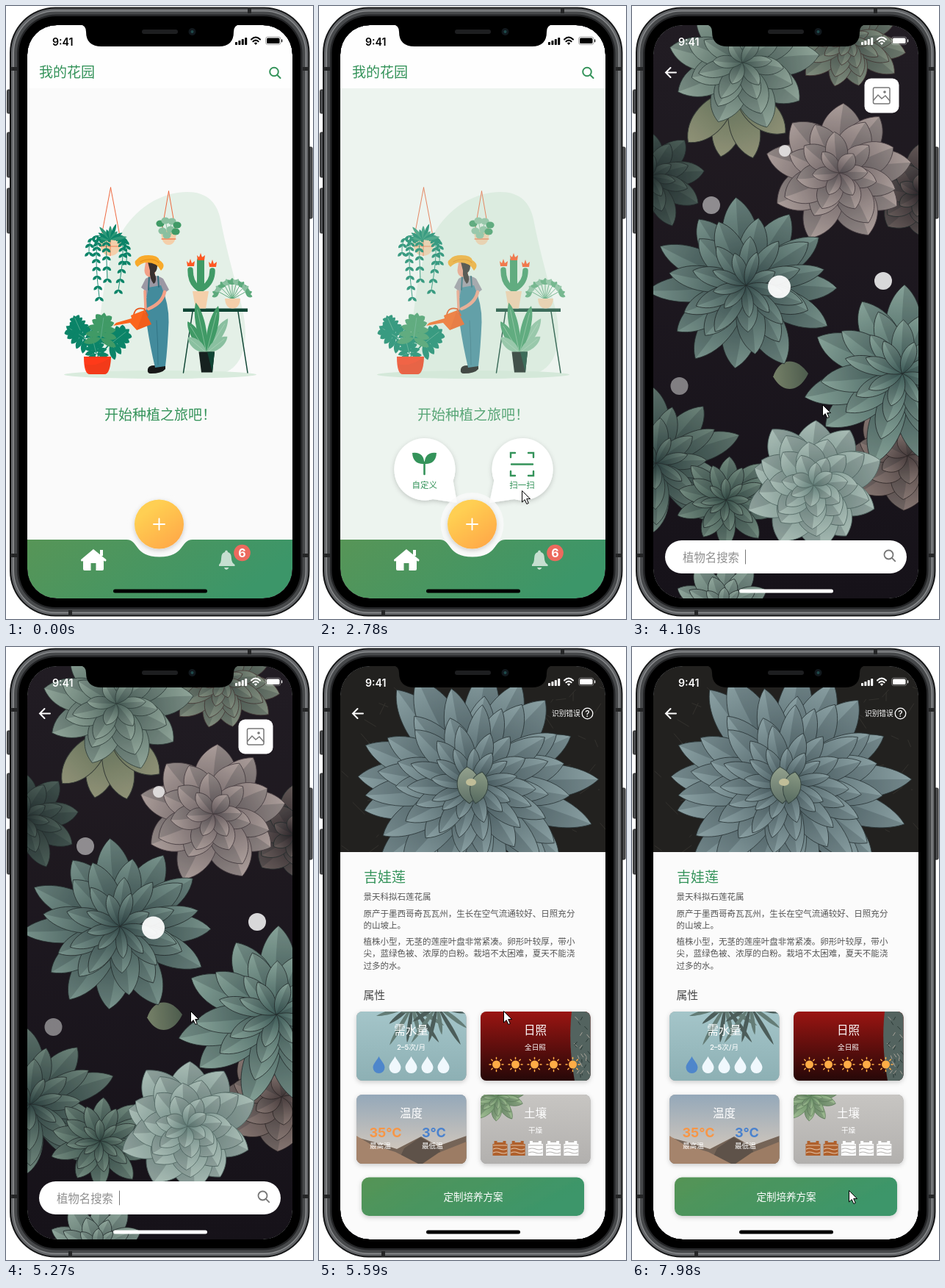
An HTML page that plays this animation: 418x834 px, repeating every 8 s.

```html
<!DOCTYPE html>
<html lang="zh-CN">
<head>
<meta charset="utf-8">
<title>我的花园</title>
<style>
html, body { margin: 0; width: 100%; height: 100%; overflow: hidden; background: #fff; }
svg { display: block; }
text { font-family: Inter, "Noto Sans CJK SC", "Noto Sans CJK", sans-serif; }
</style>
</head>
<body>
<script>
const GREEN = '#34935a';
let defs = '', seed = 7, gradients = {};
const rnd = () => (seed = (seed * 16807) % 2147483647) / 2147483647;
const jit = a => (rnd() - .5) * 2 * a;
const num = v => +v.toFixed(1);

// shape helpers
const path = (d, fill, more = '') => `<path d="${d}" fill="${fill}" ${more}/>`;
const line = (d, color, w = 1, more = '') => `<path d="${d}" fill="none" stroke="${color}" stroke-width="${w}" stroke-linecap="round" ${more}/>`;
const rect = (x, y, w, h, r, fill, more = '') => `<rect x="${x}" y="${y}" width="${w}" height="${h}" rx="${r}" fill="${fill}" ${more}/>`;
const oval = (x, y, rx, ry, fill, more = '') => `<ellipse cx="${x}" cy="${y}" rx="${rx}" ry="${ry}" fill="${fill}" ${more}/>`;
const disc = (x, y, r, fill, more) => oval(x, y, r, r, fill, more);
const text = (x, y, size, str, fill, weight = 400, anchor = 'start') =>
  `<text x="${x}" y="${y}" font-size="${size}" fill="${fill}" font-weight="${weight}" text-anchor="${anchor}">${str}</text>`;
const group = (inner, more = '') => `<g ${more}>${inner}</g>`;
const at = (x, y, inner, more = '') => group(inner, `transform="translate(${x} ${y})" ${more}`);

function grad(a, b, dir = 'x1="0" y1="1" x2="0" y2="0"') {
  const key = a + b + dir;
  if (!gradients[key]) {
    const id = gradients[key] = 'g' + Object.keys(gradients).length;
    defs += `<linearGradient id="${id}" ${dir}><stop stop-color="${a}"/><stop offset="1" stop-color="${b}"/></linearGradient>`;
  }
  return `url(#${gradients[key]})`;
}
const ACROSS = 'x1="0" y1="0" x2="1" y2=".3"';

// a leaf points up from its base before it is turned
const leafPath = (l, w) => `M0 0C${num(w)} ${num(-l * .3)} ${num(w)} ${num(-l * .78)} 0 ${num(-l)}C${num(-w)} ${num(-l * .78)} ${num(-w)} ${num(-l * .3)} 0 0Z`;
const leaf = (x, y, l, w, turn, fill, more = '') =>
  path(leafPath(l, w), fill, `transform="translate(${num(x)} ${num(y)}) rotate(${num(turn)})" ${more}`);

function petal(l, w, turn, fill, edge) {
  const half = `M0 0C${num(w)} ${num(-l * .3)} ${num(w)} ${num(-l * .78)} 0 ${num(-l)}Q${num(-w * .15)} ${num(-l * .5)} 0 0Z`;
  return group(path(leafPath(l, w), fill, `stroke="${edge}" stroke-width=".8"`) + path(half, '#0b1718', 'opacity=".17"'),
    `transform="rotate(${num(turn)})"`);
}
function rosette(x, y, r, rings, n, fat, low, high, edge = '#26302f', squash = .9) {
  let s = '';
  const fill = grad(low, high);
  for (let k = 0; k < rings; k++) {
    const l = r * (1 - .82 * k / rings), count = Math.max(4, n - k);
    for (let i = 0; i < count; i++) {
      s += petal(l * (1 + jit(.09)), l * fat * (1 + jit(.12)), (i + k * .5) * 360 / count + jit(7), fill, edge);
    }
  }
  return group(s, `transform="translate(${x} ${y}) scale(1 ${squash})"`);
}

function vine(x0, y0, cx, cy, x1, y1, n, color) {
  let s = line(`M${x0} ${y0}Q${cx} ${cy} ${x1} ${y1}`, color, .9);
  for (let i = 1; i <= n; i++) {
    const u = i / n, v = 1 - u;
    const x = v * v * x0 + 2 * u * v * cx + u * u * x1, y = v * v * y0 + 2 * u * v * cy + u * u * y1;
    s += leaf(x, y, 8, 2.6, 135, color) + leaf(x, y, 8, 2.6, 225, color);
  }
  return s;
}
function fan(x, y, l, turn, color) {
  let s = leaf(0, 0, l, l * .25, 0, color);
  for (let i = 0; i < 5; i++) for (const side of [-1, 1])
    s += leaf(0, -l * i * .16, l * (.68 - i * .07), l * .17, side * (112 - i * 15), color);
  return group(s + line(`M0 0V${-l * .8}`, '#6fb79c', .6), `transform="translate(${x} ${y}) rotate(${turn})"`);
}

const lens = (x, y, r, color, w) => disc(x, y, r, 'none', `stroke="${color}" stroke-width="${w}"`) +
  line(`M${x + r * .72} ${y + r * .72}l${r * .75} ${r * .75}`, color, w);
const backArrow = line('M60 90.5H46M52.5 84L46 90.5L52.5 97', '#fff', 2);
const homeBar = color => rect(146, 793.5, 128, 5, 2.5, color);

function status(color) {
  let s = text(63, 53.8, 14.2, '9:41', color, 600);
  for (let i = 0; i < 4; i++) s += rect(312 + i * 4.4, 49 - i * 2, 3, 4 + i * 2, .8, color);
  s += line('M334 45.5Q340 39.5 346 45.5M336.4 48.3Q340 45 343.6 48.3', color, 2) + path('M340 53l-2.2-2.4q2.2-2 4.4 0z', color);
  return s + rect(353.5, 42, 20.5, 10.5, 3, 'none', `stroke="${color}" stroke-width=".7" opacity=".5"`) +
    rect(355, 43.5, 17.5, 7.5, 1.6, color) + rect(375, 45.3, 1.2, 4, .6, color);
}

function illustration() {
  const teal = '#0b8468', mid = '#409a66', pale = '#8ac0a0', dark = '#0f4534', tan = '#f4cfaa', red = '#ee5a2c', skin = '#f2a087';
  let s = path('M119 500C128 450 128 375 149 325C166 283 205 253 247 253C272 253 287 266 292 290C299 327 309 362 319 401C333 450 326 490 295 500Z', '#e4f0e7') +
    oval(210, 501.5, 131, 5.5, '#d9ebdd');
  // hanging pots
  s += line('M142.500 247L130 313M142.500 247L155 313', red, .9) +
    path('M127 314H157Q157 340 142 340Q127 340 127 314Z', tan) + line('M127 327H157M142 314V340', red, .7);
  for (const [x, c, x1, y1, n] of [[134, 116, 127, 396, 11], [131, 112, 113, 335, 4], [138, 135, 138, 371, 7], [150, 167, 153, 386, 10], [148, 168, 164, 347, 6], [145, 155, 160, 316, 3]])
    s += vine(x, 313, c, 308, x1, y1, n, teal);
  for (let i = 0; i < 9; i++) s += leaf(142, 318, 15 + i % 3 * 4, 3, -80 + i * 20, i % 2 ? teal : '#2f9878');
  s += line('M221.500 252L212 307M221.500 252L231 307', red, .9) + path('M211 305H232Q232 325 221.500 325Q211 325 211 305Z', tan) +
    line('M212 317H231', red, 1);
  [[210, 296], [217, 292], [226, 293], [233, 298], [213, 306], [224, 304], [231, 307], [219, 312]].forEach(([x, y], i) =>
    s += line(`M221 312L${x} ${y}`, mid, .6) + oval(x, y, 5.6, 4.5, i % 3 ? pale : mid));
  // table with cacti
  s += line('M254 416L241.500 499M316 416L329 499', dark, 1.5) + rect(241, 411.500, 88, 4.500, 0, dark);
  s += line('M265 384V346', mid, 10) + line('M262 384Q251 377 251 359M268 384Q281 376 281 360', mid, 7.5);
  for (const [x, y] of [[251, 354], [265, 346], [281, 355]]) s += path(`M${x - 4} ${y}l-1-7l3 3l2-6l2 6l4-3l-1 7z`, '#ff5722');
  s += path('M254 388H276L272 411.500H258Z', tan);
  for (let i = 0; i < 9; i++) {
    const a = -64 + i * 16, q = a * Math.PI / 180, x = 308 + 21 * Math.sin(q), y = 399 - 24 * Math.cos(q);
    s += line(`M308 399L${num(x)} ${num(y)}`, mid, .8);
    for (const b of [-45, 0, 45]) s += leaf(x, y + 4, 9, 3, a + b, i % 2 ? pale : '#5daa7c');
  }
  s += path('M298 398H319Q318 411.500 308.500 411.500Q299 411.500 298 398Z', tan);
  // floor plants
  for (const [a, l, f] of [[-31, 50, mid], [32, 55, pale], [-12, 70, mid], [14, 66, mid], [-50, 33, pale], [52, 36, pale]])
    s += leaf(273, 472, l, 8.5, a, f) + line(`M273 472l${num(Math.sin(a / 57.3) * l * .85)} ${num(-Math.cos(a / 57.3) * l * .85)}`, '#bcdcc5', .5);
  s += path('M262.500 470.500H284L281 498.500H266Z', '#16211f') + path('M274 470.500H284L281 498.500Z', dark);
  s += line('M122 479Q117 461 102 450M125 479Q127 463 132 450M127 479Q136 463 148 454M121 479Q119 470 116 464', teal, 1.6);
  s += fan(108, 452, 31, -58, teal) + fan(142, 460, 33, 52, teal) + fan(123, 473, 25, -14, teal) + fan(129, 452, 35, 8, mid) + fan(101, 441, 22, -24, teal);
  s += path('M106 477H143Q142 501 134 501H114Q106 501 106 477Z', '#ff3a19') + path('M107 487Q125 492 143 477Q142 501 134 501H114Z', '#d93a1b', 'opacity=".35"');
  // gardener
  s += path('M193 494Q194 489 202 489L217 487V494Q212 500 197 500Q192 500 193 494Z', '#171717');
  s += path('M190 371Q202 363 214 371L222 386L214 392L211 397L190 396L188 386L184 383Z', '#9c98a4');
  s += path('M194 383L211 380Q222 405 221.500 430Q220 466 217 490L203 492Q196 462 192 435Q188 418 191 398Z', '#438b9c') +
    line('M194 386L195 368M208 382L207 368', '#2f6d7c', 2) + line('M205 428Q207 458 207 488', '#327485', 1);
  s += line('M216 389Q213 404 194 412', skin, 4.500) + line('M189 388L190 412', skin, 3.500);
  s += path('M190 349H203V366Q197 370 193 368Q187 365 189 355Z', skin) + path('M193 348H206Q207 360 202 363Q207 374 201 378Q195 370 196 360Z', '#37302f');
  s += path('M179 355Q172 349 179 344Q183 339 194 339Q207 339 209 346Q219 352 211 360Q205 348 190 349Q184 350 179 355Z', '#f8aa2b') + line('M183 348Q198 341 208 349', '#e69017', 1.2);
  s += line('M174 420Q176 409 188 412L193 421', '#e75319', 1.800) + path('M170 421L188 414L198 433L178 441L169 431L146 435L150 431L171 425Z', '#fb651c') + path('M188 414L198 433L178 441Z', '#e75319', 'opacity=".4"');
  return s;
}

const bubble = (tail, inner) => group(path(tail, '#fff'), 'filter="url(#soft)"') + inner;

function homeScreen() {
  const bar = 'M29 726H164C181 726 174 749.500 209 749.500C244 749.500 237 726 254 726H390V806H29Z';
  const left = disc(144, 631, 41.5, '#fff') + line('M143.500 637V621', GREEN, 2.6) +
    path('M143.500 623Q128 624 127 608Q143 606 143.500 623ZM143.500 623Q144 606 160 608Q159 624 143.500 623Z', GREEN) +
    text(143.800, 656, 11.5, '自定义', GREEN, 500, 'middle');
  const right = disc(277, 631, 41.5, '#fff') + line('M261 614V608H267M285 608H292V614M261 633V639H267M285 639H292V633M262 623.500H291', GREEN, 2.4) +
    text(276.500, 656, 11.5, '扫一扫', GREEN, 500, 'middle');
  return rect(29, 26, 361, 780, 0, '#fafafa') + illustration() + text(134, 563, 19, '开始种植之旅吧！', GREEN, 500) +
    rect(29, 112, 361, 620, 0, '#c2deca', 'id="veil"') + rect(29, 26, 361, 86, 0, '#fff', 'opacity=".9"') +
    status('#000') + text(45, 97.300, 19, '我的花园', GREEN, 500) + lens(365, 89.500, 5.800, GREEN, 2) +
    group(bubble('M102.500 631a41.500 41.500 0 1 1 80 14L188 676L155 671A41.500 41.500 0 0 1 102.500 631Z', left) +
      bubble('M318.500 631a41.500 41.500 0 1 0-80 14L232 676L266 671A41.500 41.500 0 0 0 318.500 631Z', right), 'id="bubbles"') +
    disc(208.500, 705, 43, '#fafafa', 'opacity=".8"') + path(bar, grad('#579557', '#3c9669', ACROSS)) +
    disc(208.500, 705, 33.500, grad('#ffcf52', '#ffab49', 'x1=".3" y1=".2" x2=".8" y2=".9"'), 'filter="url(#soft)"') +
    line('M201 705H216M208.500 697.500V712.500', '#fff', 1.900) +
    path('M105 753V766Q105 768 107 768H115.500V758H122.500V768H131Q133 768 133 766V753L119 742Z', '#fff') +
    line('M103.500 754L119 741L135 754', '#fff', 3) + rect(128, 740, 4, 8, 0, '#fff') +
    path('M290 762V760Q293 757 293 752Q293 744 298 743Q298 740.500 300 740.500Q302 740.500 302 743Q307 744 307 752Q307 757 311.500 760V762ZM297 764H303.500Q302 767 300 767Q298 767 297 764Z', '#c6dfd0') +
    disc(321.500, 744, 11.300, '#ec6a5e') + text(321.500, 749.800, 16, '6', '#fff', 700, 'middle') + homeBar('#000');
}

function cameraScreen() {
  let s = rect(29, 26, 361, 780, 0, grad('#17141a', '#231e25'));
  s += rosette(25, 232, 76, 3, 9, .3, '#23302f', '#52675f') + rosette(392, 255, 72, 3, 8, .4, '#2c262a', '#6d625f');
  s += rosette(295, 45, 75, 4, 11, .3, '#44564f', '#8c9a88', '#4a3c38');
  for (const [a, l] of [[192, 92], [165, 95], [222, 95], [130, 90]]) s += leaf(140, 115, l, 27, a, grad('#65775c', '#9b9e80'), 'stroke="#39413a"');
  s += rosette(150, 77, 98, 4, 9, .33, '#4d665e', '#9bb3a5', '#33443f');
  s += rosette(282, 227, 97, 4, 9, .38, '#685e60', '#b9aba6', '#4b4144', .93);
  s += rosette(375, 612, 88, 3, 8, .42, '#4d4241', '#90807a', '#302928');
  s += rosette(33, 622, 112, 4, 10, .24, '#2e4644', '#758f83');
  s += leaf(240, 500, 48, 25, 265, grad('#526352', '#7e8b6f'));
  s += rosette(155, 380, 127, 4, 12, .24, '#354e4d', '#82a097');
  s += rosette(368, 500, 133, 4, 11, .25, '#3f5f5b', '#91b0a4');
  s += rosette(128, 672, 70, 3, 10, .26, '#355049', '#7e998b') + rosette(124, 818, 68, 3, 10, .3, '#5a736b', '#9db7aa');
  s += rosette(247, 652, 92, 5, 10, .4, '#6d8c85', '#b7cdc4', '#566f69', .92);
  s += rect(29, 26, 361, 780, 0, '#100c14', 'opacity=".08"');
  for (const [x, y, r, o] of [[208, 197, 8, .72], [108, 271, 12, .5], [200.500, 382, 15.500, .93], [342, 374, 12, .83], [64.500, 517, 12, .45]])
    s += disc(x, y, r, '#fff', `opacity="${o}"`);
  s += status('#fff') + backArrow + rect(316.500, 98.500, 47, 47, 9, '#fff') +
    rect(328.500, 111, 22.500, 22, 2, 'none', 'stroke="#777" stroke-width="1.500"') +
    line('M329 128L335 121L340 126L345 122L351 129', '#777', 1.5) + disc(344, 117, 1.800, '#777');
  return s + rect(45, 727, 329, 45, 22.5, '#fff') + text(69, 755.500, 15.400, '植物名搜索', '#909090', 300) +
    line('M154.500 740V759', '#777', 1) + lens(349.500, 746.500, 6, '#777', 1.800) + homeBar('#fff');
}

function card(x, y, back, title, front) {
  return rect(x, y, 149.500, 94, 8, '#999', 'filter="url(#soft)"') +
    at(x, y, back + text(74.500, 31, 15.5, title, '#fff', 500, 'middle') + front, 'clip-path="url(#card)"');
}
const five = draw => [0, 1, 2, 3, 4].map(draw).join('');
const note = str => text(74.500, 51.800, 9.600, str, '#fff', 500, 'middle');

function waterCard(x, y) {
  let back = rect(0, 0, 150, 94, 0, grad('#8db0b4', '#a4c5c9'));
  for (const [px, a0] of [[76, 100], [110, 105]]) for (let i = 0; i < 8; i++)
    back += leaf(px, -8, 40 + i % 3 * 11, 3.800, a0 + i * 22, i % 2 ? '#647c76' : '#4c5d5a');
  return card(x, y, back, '需水量', note('2–5次/月') + five(i =>
    at(30.500 + i * 22, 61, path('M0 0C3 6 8 10 8 15A8 8 0 0 1-8 15C-8 10-3 6 0 0Z', i ? '#f0f8fd' : '#4e86cb'))));
}
function sunCard(x, y) {
  let back = rect(0, 0, 150, 94, 0, grad('#260808', '#9a1512')) + path('M124 0H150V94H128Q119 45 124 0Z', '#53635f');
  for (let i = 0; i < 28; i++) back += line(`M${num(126 + rnd() * 22)} ${num(rnd() * 92)}l${num(jit(4))} 4`, i % 2 ? '#b1aaa0' : '#263532', .9);
  let rays = disc(0, 0, 5.500, '#ffac46');
  for (let i = 0; i < 8; i++) rays += line('M0-7.500V-9.500', '#ffac46', 1.500, `transform="rotate(${i * 45})"`);
  return card(x, y, back, '日照', note('全日照') + five(i => at(21.500 + i * 26, 72, rays)));
}
function heatCard(x, y) {
  const back = rect(0, 0, 150, 94, 0, grad('#dfcebd', '#94a8b9')) +
    path('M0 58Q30 66 55 74L88 57L111 70L150 56V94H0Z', '#756457') + path('M65 73L87 58L112 72L120 94H55Z', '#5e5249') +
    path('M0 56L20 68L53 78L84 94H0Z', '#a5846c') + path('M150 64L112 79L90 94H150Z', '#9c7c64');
  return card(x, y, back, '温度', text(17.500, 58, 18, '35°C', '#f79646', 700) + text(89, 58, 18, '3°C', '#4a82ce', 700) +
    text(18, 73, 9.600, '最高温', '#fff', 500) + text(89, 73, 9.600, '最低温', '#fff', 500));
}
function soilCard(x, y) {
  const back = rect(0, 0, 150, 94, 0, grad('#b2b0ae', '#c7c5c2')) + at(23, 3, rosette(0, 0, 39, 3, 10, .25, '#648c63', '#a4bf96', '#64825f'));
  return card(x, y, back, '土壤', note('干燥') + five(i => {
    const c = i < 2 ? '#af602c' : '#fff', gap = i < 2 ? '#e2c3a8' : '#b4b2b0';
    return at(16.500 + i * 24.200, 62, path('M2 1H6V3H14V1H18V5H20V21H0V5H2Z', c) +
      line('M1 7H19M1 12q4-2 9 0t9 0M1 17q4-2 9 0t9 0', gap, 1.2));
  }));
}

function detailScreen() {
  const body = ['景天科拟石莲花属', '原产于墨西哥奇瓦瓦州，生长在空气流通较好、日照充分', '的山坡上。',
    '植株小型，无茎的莲座叶盘非常紧凑。卵形叶较厚，带小', '尖，蓝绿色被、浓厚的白粉。栽培不太困难，夏天不能浇', '过多的水。'];
  const rows = [344, 366.500, 382.500, 404.700, 421, 437.500];
  let photo = rect(29, 26, 361, 253, 0, '#22211f');
  for (let i = 0; i < 70; i++) photo += line(`M${num(29 + rnd() * 361)} ${num(26 + rnd() * 253)}l${num(jit(16))} ${num(jit(16))}`, '#34322e', 1);
  photo += rosette(209, 187, 166, 5, 17, .22, '#3d5055', '#8ba1a4', '#2b3638', .92) +
    leaf(205, 213, 50, 20, -4, grad('#5e7067', '#93a18d'), 'stroke="#354440"') + leaf(213, 213, 44, 16, 12, grad('#55695f', '#8a9a84'), 'stroke="#354440"') + oval(207, 184, 7, 5, '#c0bd98');
  return rect(29, 26, 361, 780, 0, '#fbfbfb') + group(photo, 'clip-path="url(#photo)"') + status('#fff') + backArrow +
    text(317, 94.200, 9.700, '识别错误', '#fff') + disc(365.500, 90.500, 7.300, 'none', 'stroke="#fff" stroke-width="1.300"') +
    text(365.500, 94.800, 12, '?', '#fff', 500, 'middle') + text(61, 320, 19, '吉娃莲', GREEN, 500) +
    body.map((b, i) => text(60.500, rows[i], 11.520, b, '#555')).join('') + text(60.500, 479, 14.800, '属性', '#444', 500) +
    waterCard(51, 496) + sunCard(220, 496) + heatCard(51, 609) + soilCard(220, 609) +
    rect(58, 721.500, 303, 52.500, 10, grad('#559456', '#3c966a', ACROSS), 'filter="url(#soft)"') +
    text(210, 753, 13.500, '定制培养方案', '#fff', 500, 'middle') + homeBar('#000');
}

function phone() {
  const ring = (inset, r, fill) => {
    const x = 5 + inset, y = 1.500 + inset, w = 408.500 - 2 * inset, h = 829 - 2 * inset;
    return `M${x + r} ${y}h${w - 2 * r}a${r} ${r} 0 0 1 ${r} ${r}v${h - 2 * r}a${r} ${r} 0 0 1-${r} ${r}h${2 * r - w}a${r} ${r} 0 0 1-${r}-${r}v${2 * r - h}a${r} ${r} 0 0 1 ${r}-${r}Z`;
  };
  const hole = 'M69 26H350a40 40 0 0 1 40 40V766a40 40 0 0 1-40 40H69a40 40 0 0 1-40-40V66a40 40 0 0 1 40-40Z';
  const band = (inset, r, fill) => path(ring(inset, r) + hole, fill, 'fill-rule="evenodd"');
  let s = '';
  for (const [x, y, h] of [[1.500, 114, 32], [1.500, 172, 61], [1.500, 248, 61], [411.500, 192, 97]]) s += rect(x, y, 5.500, h, 1.500, '#4c4d4f', 'stroke="#222" stroke-width="1"');
  s += band(0, 62, '#151617') + band(2, 60, '#626467') + band(4.500, 58, '#8a8c8e') + band(6, 56, '#47494b') + band(10, 53, '#242527') + band(12.500, 50, '#000');
  for (const [x, y, w, h] of [[6, 83, 9, 5], [404, 83, 9, 5], [6, 745, 9, 5], [404, 745, 9, 5], [329, 2, 5, 8], [85, 822, 5, 8]]) s += rect(x, y, w, h, 0, '#252627');
  return s + path('M100 25Q109 26 109 35Q109 55 130 55H290Q310 55 310 35Q310 26 319 25Z', '#000') +
    rect(185, 32, 49, 6, 3, '#1d1e20') + disc(253.500, 35, 5, '#11181d') + disc(253.500, 35, 2, '#1f4a4b');
}

const screens = group(group(homeScreen(), 'id="home"') + group(cameraScreen(), 'id="camera"') +
  group(detailScreen() + rect(28, 26, 1, 780, 0, '#ddd'), 'id="detail"'), 'clip-path="url(#screen)"');
const pointer = disc(0, 0, 15, '#ff0', 'id="press" opacity=".45"') +
  path('M.5.500V16L4.200 12.600L6.800 18.500L9.300 17.400L6.700 11.600H11.500Z', '#fff', 'stroke="#000" stroke-width="1"');
const art = screens + phone() + group(pointer, 'id="cursor"');
document.body.innerHTML = `<svg width="418" height="834" viewBox="0 0 418 834"><defs>${defs}
<clipPath id="screen"><rect x="29" y="26" width="361" height="780" rx="40"/></clipPath>
<clipPath id="photo"><rect x="29" y="26" width="361" height="253"/></clipPath>
<clipPath id="card"><rect width="149.500" height="94" rx="8"/></clipPath>
<filter id="soft" x="-30%" y="-30%" width="160%" height="160%"><feDropShadow dx="0" dy="2" stdDeviation="3" flood-color="#000" flood-opacity=".2"/></filter>
</defs>${art}</svg>`;

// motion: start, end, number of steps, where the pointer arrives
const moves = [[520, 980, 7, 218, 714], [2160, 2460, 5, 275, 661], [2630, 2630, 1, 276, 659], [3710, 4100, 6, 259, 542],
  [4420, 4570, 3, 251, 496], [4890, 4890, 1, 251, 495], [6450, 6910, 7, 354, 599], [7610, 7980, 6, 295, 739]];
const presses = [[1150, 1310], [2630, 2780], [5120, 5270]];
const slide = [0, .1, .535, .92, 1];
const el = id => document.getElementById(id);
const show = (id, o) => { el(id).style.display = o > 0 ? '' : 'none'; el(id).setAttribute('opacity', o); };
const step = (t, a, b, n) => t >= b ? n - 1 : t < a ? -1 : Math.floor((t - a) * (n - 1) / (b - a) + .001);

function render(t) {
  let x = 269, y = 834;
  for (const [a, b, n, tx, ty] of moves) {
    const p = (step(t, a, b, n) + 1) / n;
    x += (tx - x) * p;
    y += (ty - y) * p;
  }
  el('cursor').setAttribute('transform', `translate(${num(x)} ${num(y)})`);
  show('cursor', +(t >= 520));
  show('press', presses.some(([a, b]) => t >= a && t < b) ? .45 : 0);

  const open = Math.max(0, step(t, 1150, 1480, 5)) / 4, size = .3 + .7 * open;
  show('veil', .25 * open);
  show('bubbles', open);
  el('bubbles').setAttribute('transform', `translate(209 705) scale(${size}) translate(-209 -705)`);

  const gone = slide[Math.max(0, step(t, 5270, 5590, 5))];
  show('camera', gone === 1 ? 0 : t >= 3010 ? 1 : t >= 2930 ? .5 : 0);
  show('home', +(t < 3010));
  show('detail', +(gone > 0));
  el('detail').setAttribute('transform', `translate(${Math.round(361 * (1 - gone))} 0)`);
}
const start = performance.now();
function tick() {
  render((performance.now() - start) % 8000);
  requestAnimationFrame(tick);
}
tick();
</script>
</body>
</html>
```
